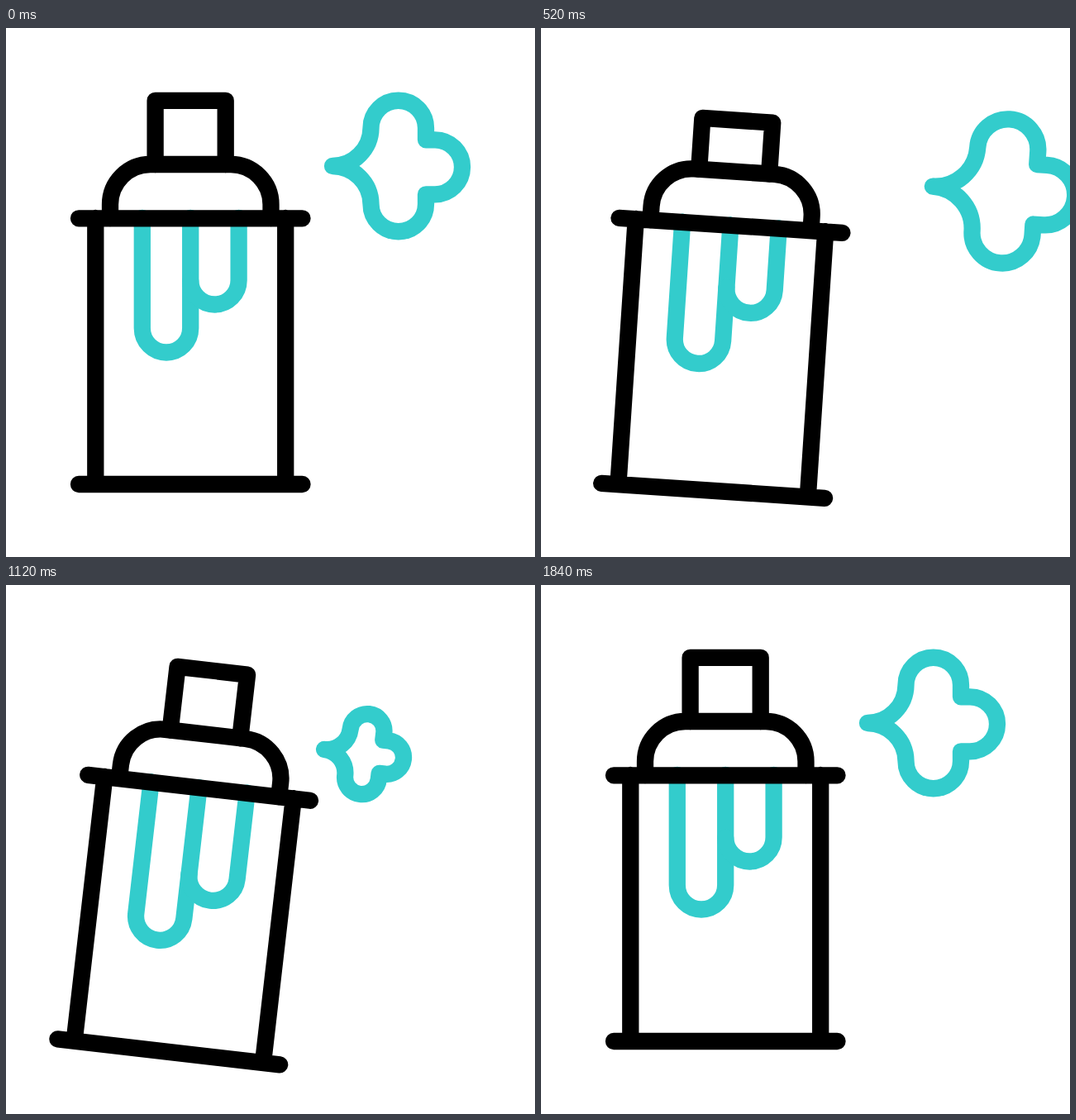
An HTML page for the animation above (1960 ms loop, 640 by 640 pixels).

```html
<!DOCTYPE html>
<html lang="en">
<head>
<meta charset="utf-8">
<title>Spray can</title>
<style>
  html, body { margin: 0; width: 100%; height: 100%; overflow: hidden; background: #fff; }
  svg { display: block; width: 100%; height: 100%; }
  path { fill: none; stroke: #000; stroke-width: 20.3; stroke-linecap: round; stroke-linejoin: round; }
  .paint { stroke: #3cc; }
</style>
</head>
<body>
<svg viewBox="0 0 640 640">
  <g id="can">
    <path id="cloud" class="paint" d="M395 167A46.5 46.5 0 0 0 441.5 121A33.2 33.2 0 0 1 508 121V135.3H519A33 33 0 0 1 519 201.3H508V213A33.2 33.2 0 0 1 441.5 213A46.5 46.5 0 0 0 395 167Z"/>
    <path id="longDrip" class="paint"/>
    <path id="shortDrip" class="paint"/>
    <path id="nozzle"/>
    <path d="M126 230V213.5A48.5 48.5 0 0 1 174.5 165H272A48.5 48.5 0 0 1 320.5 213.5V230"/>
    <path d="M88 230.3H358.5M88 552H358.5M108.3 230V552M338.2 230V552"/>
  </g>
</svg>
<script>
  const LOOP = 1960, STEP = 40, LAST = 44;
  const $ = id => document.getElementById(id);
  const can = $('can'), cloud = $('cloud'), nozzle = $('nozzle');
  const longDrip = $('longDrip'), shortDrip = $('shortDrip');

  const clamp = (v, lo, hi) => Math.min(hi, Math.max(lo, v));
  const easeInOut = p => p < 0.5
    ? 0.5 * (2 * p) ** 2.7
    : 1 - 0.5 * (2 - 2 * p) ** 2.7;
  const ramp = (k, from, to) => easeInOut(clamp((k - from) / (to - from), 0, 1));
  // Rises from a to b, holds, falls from c to d.
  const swell = (k, a, b, c, d) => ramp(k, a, b) - ramp(k, c, d);

  function placeCloud(k) {
    let x, scale;
    if (k < 18) {
      // Accelerates off the right edge while growing.
      const d = 69 * (k / 11) ** 3.38;
      x = 395 + d;
      scale = 1 + d * 0.00145;
    } else {
      // Puffs out again beside the shoulder.
      const p = clamp((k - 20.5) / 14.5, 0, 1);
      scale = 1 - (1 - p) ** 2;
      x = 326 + 69 * scale;
    }
    const shown = scale > 0.001;
    cloud.style.display = shown ? '' : 'none';
    if (!shown) return;
    cloud.setAttribute('transform', `translate(${x} 167) scale(${scale}) translate(-395 -167)`);
    cloud.style.strokeWidth = 20.3 / scale;
  }

  function draw(k) {
    const angle = 7 * swell(k, 0, 21.3, 21.3, 41.7);
    const press = 15.2 * swell(k, 0, 11.8, 11.8, 20.5);
    const low = 363.3 + 30 * swell(k, 5.2, 20.4, 21.6, 37);
    const high = 305.3 + 30 * swell(k, 12.3, 27.5, 29, 44);
    can.setAttribute('transform', `rotate(${angle} 98 328)`);
    nozzle.setAttribute('d', `M180.6 165V${87.8 + press}H265.7V165`);
    longDrip.setAttribute('d', `M164.8 230V${low}A29.2 29.2 0 0 0 223.2 ${low}V230`);
    shortDrip.setAttribute('d', `M223.2 ${high}A29.2 29.2 0 0 0 281.6 ${high}V230`);
    placeCloud(k);
  }

  const start = performance.now();
  function tick() {
    const t = (performance.now() - start) % LOOP;
    draw(clamp(Math.floor(t / STEP) - 2, 0, LAST));
    requestAnimationFrame(tick);
  }
  tick();
</script>
</body>
</html>
```
